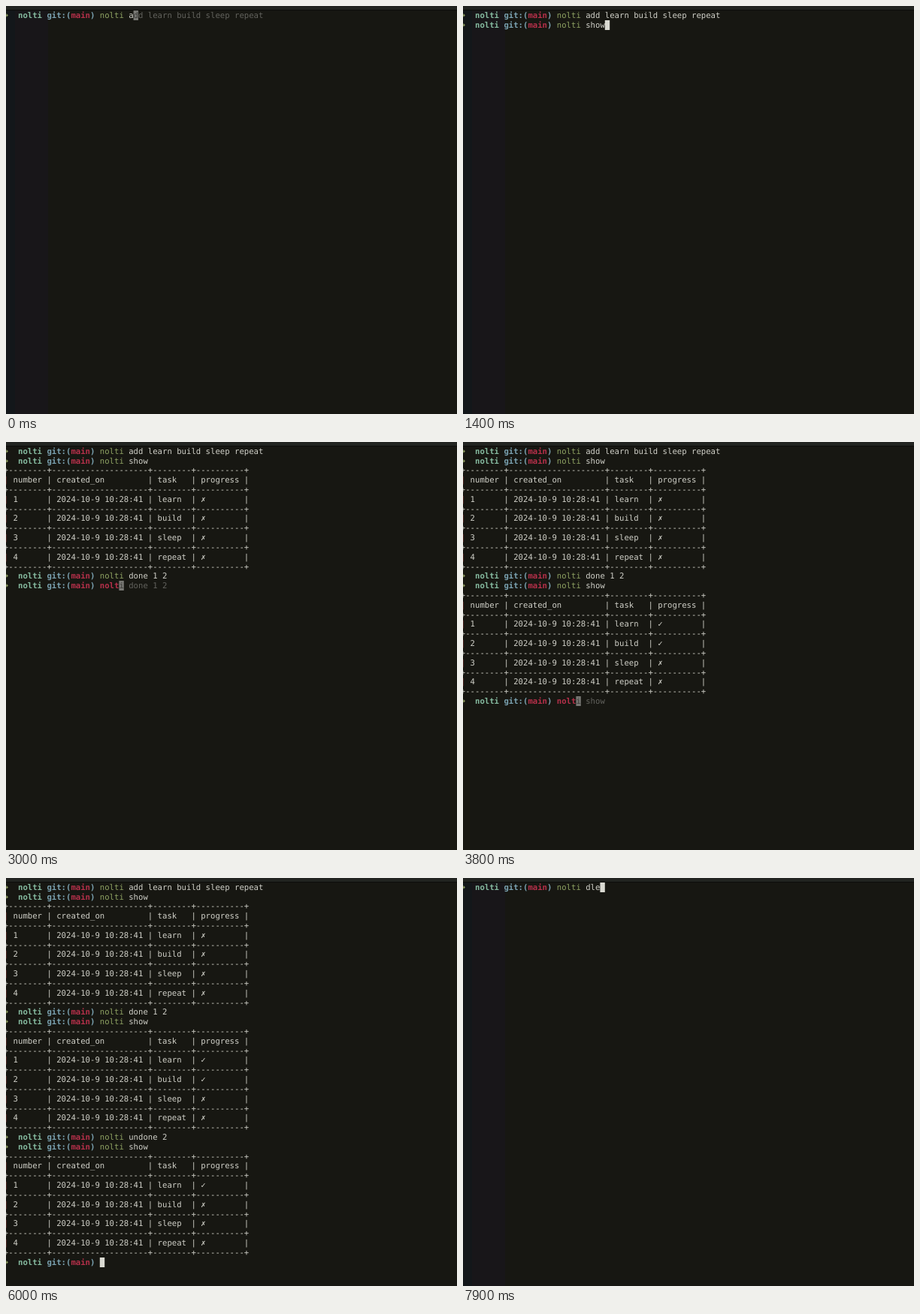
An HTML page with a canvas that plays this animation: 600x544 px, repeating every 8 s.

```html
<!DOCTYPE html>
<html lang="en">
<head>
<meta charset="utf-8">
<title>Terminal to-do list</title>
<style>
html, body { margin: 0; width: 100%; height: 100%; overflow: hidden; background: #171712; }
canvas { display: block; }
</style>
</head>
<body>
<canvas id="stage" width="600" height="544"></canvas>
<script>
const ctx = document.getElementById('stage').getContext('2d');
const LOOP = 8000;
const APP = 'nolti';
const CELL = 6.4, LINE = 12.82, LEFT = -3.2, TOP = 5.8, BASE = 9.9;
const FONT = '10.63px "DejaVu Sans Mono", monospace';
const COLOR = {
  bg: '#171712', text: '#d0d0c8', ghost: '#62625d', cursor: '#dadad2', dim: '#777773',
  arrow: '#8f9f62', dir: '#86bba0', git: '#7ba3b2', bad: '#b5304a', good: '#8fa363', edge: '#a04444'
};
const TASKS = ['learn', 'build', 'sleep', 'repeat'];
const WIDTHS = [6, 18, 6, 8];

// [time, text at the prompt]; $ is the app name, a final newline runs the line
const STEPS = [
  [0, '$ a'], [100, '$ ad'], [200, '$ add learn build sleep repeat'],
  [600, '$ add learn build sleep repeat\n'],
  [900, '$2'], [1000, '$4'], [1100, '$ '], [1200, '$ s'], [1300, '$ sho'], [1400, '$ show'], [1600, '$ show\n'],
  [1800, '$1'], [1900, '$4'], [2000, '$ '], [2100, '$ d'], [2200, '$ do'], [2300, '$ done'], [2400, '$ done '],
  [2500, '$ done 1'], [2600, '$ done 1 '], [2700, '$ done 1 2'], [2800, '$ done 1 2\n'],
  [2900, '$2'], [3000, '$4'], [3100, '$ '], [3200, '$ sh'], [3300, '$ show'], [3500, '$ show\n'],
  [3600, '$1'], [3700, '$2'], [3800, '$4'], [3900, '$'], [4000, '$ u'], [4100, '$ un'], [4200, '$ undo'],
  [4300, '$ undon'], [4400, '$ undone'], [4500, '$ undone '], [4700, '$ undone 2'], [5200, '$ undone 2\n'],
  [5300, '$1'], [5400, '$2'], [5500, '$4'], [5600, '$ '], [5700, '$ s'], [5800, '$ sho'], [5900, '$ show'],
  [6000, '$ show\n'],
  [6700, 'c'], [6800, 'cl'], [6900, 'cle'], [7000, 'clear'], [7100, 'clear\n'],
  [7200, '$1'], [7300, '$4'], [7400, '$'], [7500, '$ '], [7700, '$ dl'], [7900, '$ dle']
].map(([time, text]) => [time, text
  .replace(/\$(\d)/, (_, count) => APP.slice(0, count))
  .replace('$', APP)]);

const run = (text, color = COLOR.text, bold = false) => ({ text, color, bold });

function commandRuns(input) {
  const word = input.split(' ')[0];
  const known = word === APP || word === 'clear';
  return [run(word, known ? COLOR.good : COLOR.bad, !known), run(input.slice(word.length))];
}

function promptRuns(input) {
  return [
    run('➜  ', COLOR.arrow, true), run(APP + ' ', COLOR.dir, true), run('git:(', COLOR.git, true),
    run('main', COLOR.bad, true), run(') ', COLOR.git, true), ...commandRuns(input)
  ];
}

function tableRows(done) {
  const border = [run('+' + WIDTHS.map(w => '-'.repeat(w + 2) + '+').join(''))];
  const line = cells => [
    run('|', COLOR.edge),
    run(cells.map((cell, i) => ' ' + cell.padEnd(WIDTHS[i]) + ' |').join(''))
  ];
  const rows = [border, line(['number', 'created_on', 'task', 'progress']), border];
  TASKS.forEach((task, i) => {
    const id = String(i + 1);
    rows.push(line([id, '2024-10-9 10:28:41', task, done.has(id) ? '✓' : '✗']), border);
  });
  return rows;
}

// Replays the session up to the given time
function sessionAt(time) {
  const history = ['clear', APP + ' add learn build sleep repeat'];
  const done = new Set();
  let rows = [], input = '';
  for (const [start, text] of STEPS) {
    if (start > time) break;
    input = text;
    if (!text.endsWith('\n')) continue;
    const command = text.trim();
    const [, verb, ...ids] = command.split(' ');
    rows.push(promptRuns(command));
    history.push(command);
    if (verb === 'done') ids.forEach(id => done.add(id));
    if (verb === 'undone') ids.forEach(id => done.delete(id));
    if (verb === 'show') rows.push(...tableRows(done));
    if (command === 'clear') rows = [];
    input = '';
  }
  const match = input && history.reverse().find(old => old.startsWith(input));
  return { rows, input, ghost: match ? match.slice(input.length) : '' };
}

function box(color, x, y, w, h) {
  ctx.fillStyle = color;
  ctx.fillRect(x, y, w, h);
}

// Every character sits in its own grid cell; returns the next free column
function drawRuns(runs, row, col = 0) {
  for (const { text, color, bold } of runs) {
    ctx.font = (bold ? 'bold ' : '') + FONT;
    ctx.fillStyle = color;
    for (const char of text) {
      if (char !== ' ') ctx.fillText(char, LEFT + col * CELL, TOP + row * LINE + BASE);
      col++;
    }
  }
  return col;
}

function draw(time) {
  const { rows, input, ghost } = sessionAt(time);
  box(COLOR.bg, 0, 0, 600, 544);
  if (rows.length < 3) {
    box('#13171a', 0, 6, 12, 538);
    box('#181619', 12, 6, 44, 538);
  }
  box('#222421', 0, 0, 600, 5);
  box('#0d0d0b', 0, 5, 600, 1);

  rows.forEach((runs, row) => drawRuns(runs, row));
  const row = rows.length;
  const col = drawRuns(promptRuns(input), row);
  const top = Math.round(TOP + row * LINE);
  box(ghost ? COLOR.dim : COLOR.cursor, LEFT + col * CELL, top, CELL, 13);
  drawRuns([run(ghost.slice(0, 1), '#3a3a37'), run(ghost.slice(1), COLOR.ghost)], row, col);
}

ctx.textRendering = 'geometricPrecision';
const begin = performance.now();
function tick() {
  draw((performance.now() - begin) % LOOP);
  requestAnimationFrame(tick);
}
tick();
</script>
</body>
</html>
```
